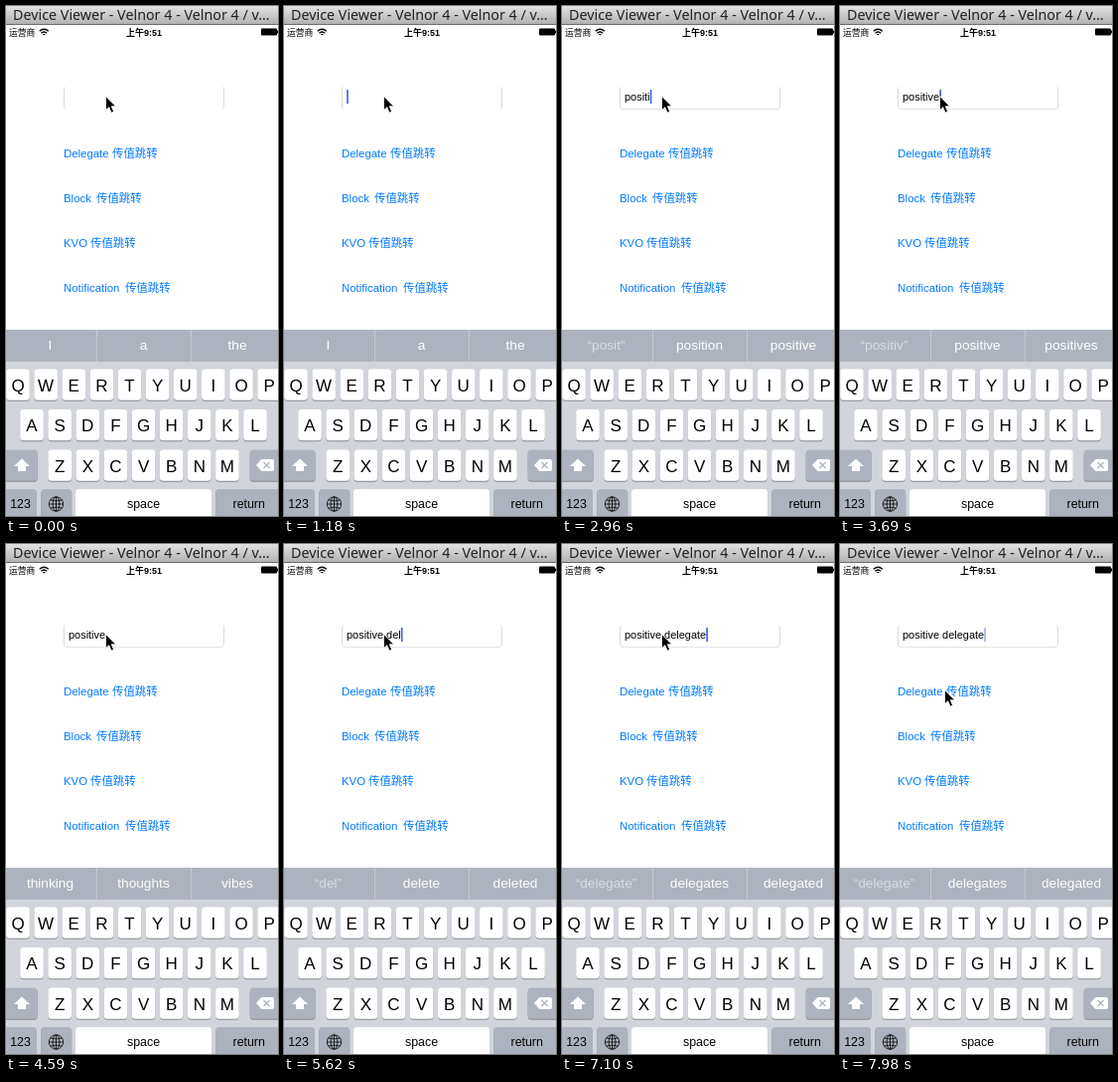
Write an HTML page that moves like this. It is 274 by 512 pixels and loops after 8 s.

```html
<!DOCTYPE html>
<html lang="zh">
<head>
<meta charset="utf-8">
<title>Text field demo</title>
<style>
html, body { margin: 0; width: 100%; height: 100%; overflow: hidden; background: #fff; }
svg { display: block; width: 100vw; height: 100vh; font-family: "Liberation Sans", "Noto Sans CJK SC", "Noto Sans CJK", sans-serif; }
text { white-space: pre; }
.title { font: 14.3px "Noto Sans", sans-serif; fill: #222; }
.link { font-size: 11.4px; fill: #007aff; }
.mid { text-anchor: middle; }
.letter { font-size: 17px; }
.label { font-size: 12.4px; }
.hint { font-size: 13.7px; fill: #fff; }
.key { fill: #fff; }
.dark { fill: #acb3be; }
.shade { fill: #898c91; }
</style>
</head>
<body>
<svg viewBox="0 0 274 512" preserveAspectRatio="none">
  <defs>
    <linearGradient id="bar" x2="0" y2="1">
      <stop stop-color="#e2e2e2"/><stop offset="1" stop-color="#b2b2b2"/>
    </linearGradient>
  </defs>
  <rect width="274" height="512" fill="#fff"/>
  <rect width="274" height="18" fill="url(#bar)"/>
  <rect y="18" width="274" height="1" fill="#6c6c6c"/>
  <text class="title" x="7" y="13.5">Device Viewer - Velnor 4 - Velnor 4 / v…</text>

  <text x="3" y="30" font-size="8.8">运营商</text>
  <g fill="none" stroke="#000" stroke-width="1.4">
    <path d="M33.8 25.3Q38.3 21.2 42.8 25.3M35.5 27.2Q38.3 24.6 41.1 27.2"/>
    <path d="M36.8 28L38.3 29.6L39.8 28Z" fill="#000" stroke="none"/>
  </g>
  <text class="mid" x="139" y="30" font-size="9" font-weight="700">上午9:51</text>
  <rect x="257" y="22.5" width="16" height="7" rx="1"/>
  <path d="M273.5 24.5V27.5" stroke="#000"/>

  <g fill="none" stroke="#dcdcdc">
    <path d="M59.5 81.5Q58.5 82 58.5 84V100Q58.5 102.5 60 103.2M218.5 81.5Q219.5 82 219.5 84V100Q219.5 102.5 218 103.2"/>
    <path id="edge" d="M60 103.5H218" stroke="#e4e4e4"/>
  </g>
  <text id="field" x="63" y="95.3" font-size="10.95"></text>
  <rect id="caret" y="84" width="1.6" height="14" fill="#3a5cee"/>

  <g id="links"></g>
  <rect y="325" width="274" height="32" fill="#acb3be"/>
  <rect y="357" width="274" height="155" fill="#d1d5db"/>
  <path d="M91.5 325V357M186.5 325V357" stroke="#c3c8d0"/>
  <g id="hints"></g>
  <g id="keys"></g>

  <path d="M16 454.5L24 462H20V467H12V462H8Z" fill="#fff"/>
  <path d="M252 461L257.5 455H268Q270 455 270 457V465Q270 467 268 467H257.5Z" fill="#fff"/>
  <path d="M259.5 458L265.5 464M265.5 458L259.5 464" stroke="#acb3be" stroke-width="1.3"/>
  <g fill="none" stroke="#111" stroke-width=".9">
    <circle cx="50.5" cy="500" r="7.2"/>
    <ellipse cx="50.5" cy="500" rx="3.4" ry="7.2"/>
    <path d="M43.3 500H57.7M50.5 492.8V507.2M44.8 496Q50.5 498 56.2 496M44.8 504Q50.5 502 56.2 504"/>
  </g>
  <path id="pointer" d="M0 0V14.2L3.2 11.2L5.6 16.7L8.1 15.6L5.8 10.3H10.2Z" stroke="#fff" stroke-width=".9"/>
</svg>
<script>
const LOOP = 8000, FADE = 145;
const byId = id => document.getElementById(id);

function add(parent, tag, attrs, content = '') {
  const el = document.createElementNS('http://www.w3.org/2000/svg', tag);
  for (const name in attrs) el.setAttribute(name, attrs[name]);
  el.textContent = content;
  return parent.appendChild(el);
}

// Static parts
[['Delegate', 107], ['Block', 91], ['KVO', 85], ['Notification', 120]].forEach(([word, x], i) => {
  const y = 152 + 45 * i;
  add(byId('links'), 'text', { class: 'link', x: 58, y }, word);
  add(byId('links'), 'text', { class: 'link', x, y }, '传值跳转');
});

function key(x, y, width, kind, label = '', style = 'label', baseline = 18.8) {
  const box = { x, width, height: 31.2, rx: 3.5 };
  add(byId('keys'), 'rect', { ...box, y: y + 1, class: 'shade' });
  add(byId('keys'), 'rect', { ...box, y, class: kind });
  add(byId('keys'), 'text', { class: 'mid ' + style, x: x + width / 2, y: y + baseline }, label);
}
[['QWERTYUIOP', 12], ['ASDFGHJKL', 26], ['ZXCVBNM', 54.2]].forEach(([letters, x], row) =>
  [...letters].forEach((c, i) =>
    key(x + 28.125 * i - 11.8, 364.5 + 40.5 * row, 23.6, 'key', c, 'letter', 22)));
key(-2, 445.5, 33.6, 'dark');
key(245.7, 445.5, 32, 'dark');
key(-2, 485, 33, 'dark', '123');
key(35.2, 485, 31, 'dark');
key(70, 485, 137, 'key', 'space');
key(211.2, 485, 67, 'dark', 'return');

// Timelines
const PHRASE = 'positive delegate';
const strokes = [1620, 1770, 2070, 2370, 2660, 2960, 3250, 3690, 3990,
                 4880, 5170, 5470, 5910, 6060, 6210, 6360, 6660];
const suggestions = [
  [-1000, 'I|a|the'],
  [1770, '“p”|put|play'],
  [1920, '“po”|polite|post'],
  [2070, '“pos”|polited|poss'],
  [2220, '“pos”|polited|possib'],
  [2510, '“posi”|position|positive'],
  [2810, '“posit”|position|positive'],
  [3110, '“positi”|positive|position'],
  [3400, '“positiv”|positive|positives'],
  [3840, '“positive”|positive|positives'],
  [4140, 'thinking|thoughts|vibes'],
  [5030, '“d”|do|day'],
  [5320, '“de”|design|description'],
  [5470, '“del”|delete|deleted'],
  [6060, '“dele”|delete|deleted'],
  [6210, '“delega”|delegation|delegates'],
  [6360, '“delegat”|delegation|delegates'],
  [6810, '“delegate”|delegates|delegated']
].map(([at, words]) => [at, words.split('|')]);
const blinks = [[0, 0], [140, .5], [290, 1], [740, .5], [880, 0], [1180, 1], [4440, .5],
                [4590, 0], [4880, 1], [7240, .5], [7390, 0], [7980, .5]];
const travel = [[0, 0], [7240, .06], [7390, .4], [7540, .85], [7690, 1]];

const indexAt = (list, t) => list.findLastIndex(([at]) => at <= t);
const valueAt = (list, t) => list[indexAt(list, t)][1];

const hints = [44.5, 138.5, 233].map(center => {
  const pair = [0, 1].map(() => {
    const text = add(byId('hints'), 'text', { class: 'hint', y: 345 });
    return { text, head: add(text, 'tspan', {}), tail: add(text, 'tspan', {}) };
  });
  return { center, older: pair[0], newer: pair[1] };
});

function fill(part, word, split, headAlpha, tailAlpha) {
  part.head.textContent = word.slice(0, split);
  part.tail.textContent = word.slice(split);
  part.head.setAttribute('fill-opacity', headAlpha);
  part.tail.setAttribute('fill-opacity', tailAlpha);
}

// The shared start of both words stays; only the endings cross-fade.
function drawHint({ center, older, newer }, from, to, fade) {
  let split = 0;
  while (split < to.length && from[split] === to[split]) split++;
  const alpha = to[0] === '“' ? .55 : 1;
  fill(newer, to, split, alpha, alpha * fade);
  fill(older, from, split, 0, alpha * (1 - fade));
  const x = center - newer.text.getComputedTextLength() / 2;
  newer.text.setAttribute('x', x);
  older.text.setAttribute('x', x);
}

function draw(t) {
  const field = byId('field');
  field.textContent = PHRASE.slice(0, strokes.filter(at => at <= t).length);
  const width = field.textContent ? field.getComputedTextLength() : 0;
  byId('caret').setAttribute('x', 63.2 + width);
  byId('caret').setAttribute('opacity', valueAt(blinks, t));
  byId('edge').setAttribute('opacity', t < strokes[0] ? 0 : 1);

  const i = indexAt(suggestions, t);
  const [at, words] = suggestions[i];
  const previous = suggestions[Math.max(0, i - 1)][1];
  const fade = t - at < FADE ? .5 : 1;
  hints.forEach((hint, k) => drawHint(hint, previous[k], words[k], fade));

  const p = valueAt(travel, t);
  byId('pointer').setAttribute('transform', `translate(${100.5 + 5 * p} ${90.5 + 56 * p})`);
}

const start = performance.now();
function tick() {
  draw((performance.now() - start) % LOOP);
  requestAnimationFrame(tick);
}
tick();
</script>
</body>
</html>
```
